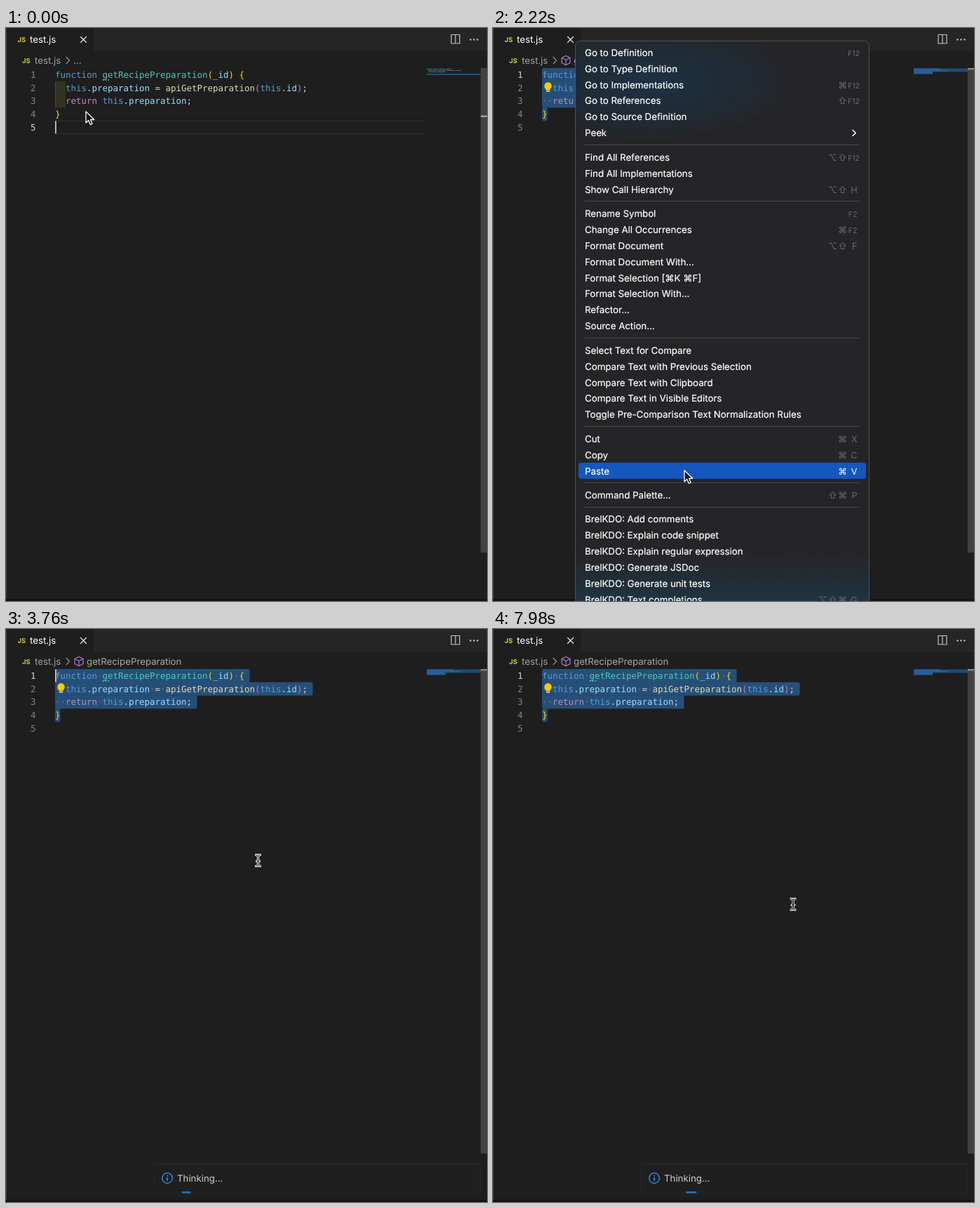
Write an HTML page that moves like this. It is 686x816 px and loops after 8000 ms.

```html
<!DOCTYPE html>
<html lang="en">
<head>
<meta charset="utf-8">
<title>Editor context menu</title>
<style>
  html, body { margin: 0; width: 100%; height: 100%; overflow: hidden; background: #1e1e1e; }
  svg { display: block; width: 686px; height: 816px; }
  text { font: 13.27px Inter, "DejaVu Sans", sans-serif; white-space: pre; text-rendering: geometricPrecision; }
  .code text { font: 12.46px "DejaVu Sans Mono", monospace; }
  .js { font-size: 9.4px; font-weight: 700; fill: #cbcb41; }
  .label { fill: #fff; stroke: #fff; stroke-width: .2px; }
  .key { font-size: 12.6px; fill: #6c6c6f; }
  .key.small { font-size: 10.6px; }
  .key.on { fill: #fff; }
  .line { fill: none; stroke-linecap: round; stroke-linejoin: round; }
</style>
</head>
<body>
<svg viewBox="0 0 686 816">
  <defs>
    <radialGradient id="topTint" gradientUnits="userSpaceOnUse" cx="0" cy="0" r="1" gradientTransform="translate(225 75) scale(215 85)">
      <stop offset="0" stop-color="#1b344b" stop-opacity=".8"/>
      <stop offset=".6" stop-color="#1b3042" stop-opacity=".5"/>
      <stop offset="1" stop-color="#1b3042" stop-opacity="0"/>
    </radialGradient>
    <linearGradient id="bottomTint" x2="0" y2="1">
      <stop offset="0" stop-color="#1d394a" stop-opacity="0"/>
      <stop offset="1" stop-color="#1d394a" stop-opacity=".75"/>
    </linearGradient>
  </defs>

  <rect width="686" height="816" fill="#1e1e1e"/>
  <rect x="125" width="561" height="33" fill="#252526"/>
  <rect width="1" height="816" fill="#3a3a3a"/>
  <rect y="813" width="686" height="3" fill="#190f15"/>
  <text class="js" x="16.5" y="20">JS</text>
  <text x="34" y="21.3" fill="#fff">test.js</text>
  <path class="line" d="M106.5 12.5l8 8m0-8l-8 8" stroke="#e8e8e8" stroke-width="1.2"/>
  <path class="line" d="M635 9.5h12v12.5h-12zM641 9.5v12.5" stroke="#c5c5c5" stroke-width="1.2"/>
  <g fill="#c5c5c5"><circle cx="662.5" cy="16.5" r="1.2"/><circle cx="667.5" cy="16.5" r="1.2"/><circle cx="672.5" cy="16.5" r="1.2"/></g>

  <text class="js" x="23" y="49.5">JS</text>
  <text id="crumbFile" x="41" y="51">test.js</text>
  <path class="line" d="M86 41.5l4.5 4.7-4.5 4.7" stroke="#a0a0a0" stroke-width="1.1"/>
  <text id="crumbDots" x="96" y="51" fill="#a0a0a0">...</text>
  <g id="crumbSymbol">
    <path class="line" d="M104 39.5l6 3v7l-6 3.2-6-3.2v-7zM98 42.5l6 3 6-3M104 45.5v7" stroke="#b180d7" stroke-width="1.1"/>
    <text x="115" y="51" fill="#a9a9a9">getRecipePreparation</text>
  </g>

  <rect x="677" y="57" width="9" height="690" fill="#424242"/>
  <rect id="rulerMark" x="677" width="9" height="2.5"/>
  <g id="mapPlain">
    <path d="M600 58.5h35" stroke="#347e73" stroke-dasharray="8 1"/>
    <path d="M602 60.5h47M602 62.5h25" stroke="#4b7180" stroke-dasharray="12 1"/>
    <path d="M600 66h77" stroke="#264f78" stroke-width="2"/>
  </g>
  <g id="mapSelected">
    <rect x="600" y="57.5" width="77" height="5" fill="#1f4a75"/>
    <path d="M600 58.5h38M600 60.5h49M600 62.5h27M600 64.5h27" stroke="#265f97" stroke-width="2"/>
  </g>

  <g id="lineBox" fill="none" stroke="#303030"><path d="M70 132.5h526M70 150.5h526"/></g>
  <rect x="70" y="75.75" width="15" height="37.5" fill="#32321f"/>
  <path d="M70.5 75.75v37.5" stroke="#4a4a3c"/>
  <g id="selection" fill="#264f78"></g>
  <g id="code" class="code"></g>
  <g fill="#4ec9b0"><circle cx="138.7" cy="74" r="1"/><circle cx="142.4" cy="74" r="1"/><circle cx="146.1" cy="74" r="1"/></g>
  <g id="bulb">
    <path d="M78.5 77.3a5.3 5.3 0 0 1 3.1 9.5v1.7h-6.2v-1.7a5.3 5.3 0 0 1 3.1-9.5z" fill="#ffcc00"/>
    <path d="M76 90h5" stroke="#d8d8d8" stroke-width="1.6"/>
  </g>
  <rect id="caret" width="1.8" height="18" fill="#c8c8c5"/>

  <g id="toast">
    <rect x="211.5" y="761.5" width="465" height="42.5" fill="#1f1f20" stroke="#272728"/>
    <circle cx="230" cy="782" r="7.3" fill="none" stroke="#3794ff" stroke-width="1.3"/>
    <path d="M230 781v5M230 777.8v1.6" stroke="#3794ff" stroke-width="1.5"/>
    <text x="244" y="787" fill="#d0d0d0">Thinking...</text>
    <rect id="bar" y="801" height="2.4" fill="#1f78c8"/>
  </g>

  <g id="menu">
    <rect x="117.5" y="18.5" width="419" height="830" rx="6" fill="#252527" stroke="#505053"/>
    <rect x="118" y="19" width="418" height="150" rx="6" fill="url(#topTint)"/>
    <rect x="118" y="745" width="418" height="71" fill="url(#bottomTint)"/>
    <rect id="highlight" x="122" width="410" height="23" rx="4" fill="#1457bf"/>
  </g>

  <g stroke-linejoin="round">
    <path id="arrow" d="M0 0v16l3.7-3.5 2.6 6 2.8-1.2-2.6-5.8h5.2z" fill="#111" stroke="#fff" stroke-width="1.3"/>
    <g id="beam" fill="none" stroke-linecap="round">
      <path d="M-3 -8q3 0 3 2.5v11q0 2.5-3 2.5M3 -8q-3 0-3 2.5v11q0 2.5 3 2.5M-2 1h4" stroke="#f4f4f4" stroke-width="3.2"/>
      <path d="M-3 -8q3 0 3 2.5v11q0 2.5-3 2.5M3 -8q-3 0-3 2.5v11q0 2.5 3 2.5M-2 1h4" stroke="#111" stroke-width="1"/>
    </g>
    <path id="hand" d="M-1.4 1q0-1.6 1.4-1.6T1.4 1v5.2l2.2.2 2.2.6 1.8 1q1 .7.7 2.5l-.8 3.2-1.5 3.3h-6.5q-1-2.3-2.8-4.2l-2.5-3q-.6-1.8 1.3-1.7l3.1 2z" fill="#fff" stroke="#222" stroke-width=".9"/>
  </g>
</svg>
<script>
const LOOP = 8000, ROW = 18.75, TOP = 57, LEFT = 70, CHAR = 7.5;
const $ = id => document.getElementById(id);
const clamp = (v, lo, hi) => Math.min(hi, Math.max(lo, v));

function add(parent, tag, attrs, content) {
  const el = document.createElementNS("http://www.w3.org/2000/svg", tag);
  set(el, attrs);
  if (content) el.textContent = content;
  return parent.appendChild(el);
}
function set(el, attrs) {
  for (const name in attrs) el.setAttribute(name, attrs[name]);
}
const show = (el, on) => { el.style.display = on ? "" : "none"; };

// Code: each line is a list of [colour, text] pieces.
const BLUE = "#569cd6", SKY = "#9cdcfe", GOLD = "#ffd700", PINK = "#da70d6", PLAIN = "#d4d4d4";
const lines = [
  [[BLUE, "function "], ["#4ec9b0", "getRecipePreparation"], [GOLD, "("], [SKY, "_id"], [GOLD, ") {"]],
  [[BLUE, "  this"], [PLAIN, "."], [SKY, "preparation"], [PLAIN, " = "], ["#dcdcaa", "apiGetPreparation"],
   [PINK, "("], [BLUE, "this"], [PLAIN, "."], [SKY, "id"], [PINK, ")"], [PLAIN, ";"]],
  [["#c586c0", "  return "], [BLUE, "this"], [PLAIN, "."], [SKY, "preparation"], [PLAIN, ";"]],
  [[GOLD, "}"]],
  []
];
const numbers = [], selected = [];
lines.forEach((pieces, i) => {
  const y = TOP + 13.8 + i * ROW;
  numbers.push(add($("code"), "text", { x: 42.5, y, "text-anchor": "end" }, String(i + 1)));
  const row = add($("code"), "text", { x: LEFT, y });
  pieces.forEach(([fill, text]) => add(row, "tspan", { fill }, text));
  if (i > 3) return;
  const text = row.textContent;
  const width = (text.length + (i < 3 ? 1 : 0)) * CHAR;
  const back = add($("selection"), "rect", { x: LEFT, y: TOP + i * ROW, width, height: ROW + .2, rx: 2.5 });
  const dots = add($("code"), "text", { x: LEFT, y, fill: "#e3e4e2", opacity: .3 },
    [...text].map(c => c === " " ? "·" : " ").join(""));
  selected.push([back, dots]);
});

// Menu: groups of "label|modifiers|key".
const BOT = "BrelKDO: ";
const groups = [
  ["Go to Definition||F12", "Go to Type Definition", "Go to Implementations|⌘|F12", "Go to References|⇧|F12",
   "Go to Source Definition", "Peek"],
  ["Find All References|⌥⇧|F12", "Find All Implementations", "Show Call Hierarchy|⌥⇧|H"],
  ["Rename Symbol||F2", "Change All Occurrences|⌘|F2", "Format Document|⌥⇧|F", "Format Document With...",
   "Format Selection [⌘K ⌘F]", "Format Selection With...", "Refactor...", "Source Action..."],
  ["Select Text for Compare", "Compare Text with Previous Selection", "Compare Text with Clipboard",
   "Compare Text in Visible Editors", "Toggle Pre-Comparison Text Normalization Rules"],
  ["Cut|⌘|X", "Copy|⌘|C", "Paste|⌘|V"],
  ["Command Palette...|⇧⌘|P"],
  ["Add comments", "Explain code snippet", "Explain regular expression", "Generate JSDoc",
   "Generate unit tests", "Text completions|⌥⇧⌘|G"].map(label => BOT + label)
];
const items = [];
let itemY = 34.9;
groups.forEach((group, g) => {
  if (g) {
    add($("menu"), "rect", { x: 131, y: Math.round(itemY - 6.3), width: 391, height: 1, fill: "#4b4b4e" });
    itemY += 11.45;
  }
  group.forEach(entry => {
    const [label, mods = "", key = ""] = entry.split("|");
    const y = itemY + 4.8, keys = [];
    add($("menu"), "text", { class: "label", x: 131, y }, label);
    [...mods].reverse().forEach((mod, i) =>
      keys.push(add($("menu"), "text", { class: "key", x: 498.5 - 14 * i, y, "text-anchor": "middle" }, mod)));
    if (key) keys.push(add($("menu"), "text", {
      class: key.length > 1 ? "key small" : "key", x: key === "F12" ? 523 : 519.5, y, "text-anchor": "end"
    }, key));
    if (label === "Peek") add($("menu"), "path", {
      class: "line", d: `M513 ${itemY - 4}l4.3 4-4.3 4`, stroke: "#fff", "stroke-width": 1.6
    });
    items.push({ y: itemY, keys });
    itemY += 22.92;
  });
});

// Pointer stops: time, x, y.
const stops = [
  [0, 114, 119], [60, 114, 119], [220, 79, 123], [300, 79, 123], [680, 25, 18], [860, 29, 21],
  [1120, 57, 48], [1200, 57, 48], [1520, 116, 88], [1760, 116, 88], [2180, 273, 630], [2260, 273, 630],
  [2620, 291, 768], [3020, 292, 768], [3220, 287, 672], [3560, 350, 350], [3900, 365, 318],
  [5200, 365, 318], [5500, 364, 318], [7420, 364, 318], [7900, 428, 392], [LOOP, 428, 392]
];
function pointerAt(t) {
  const i = stops.findIndex(s => s[0] > t);
  const [t0, x0, y0] = stops[i - 1], [t1, x1, y1] = stops[i];
  const u = (t - t0) / (t1 - t0), e = u * u * (3 - 2 * u);
  return [x0 + (x1 - x0) * e, y0 + (y1 - y0) * e];
}
function pointerKind(t, y) {
  if (t > 900 && t < 1400 && y > 36 && y < 57) return "hand";
  const editing = t > 130 && t < 1660 || t > 3280;
  return editing && y > 57 ? "beam" : "arrow";
}

const MENU_OPEN = 1660, MENU_FADE = 3040, MENU_GONE = 3270, TOAST = 3405;

function drawEditor(t, y) {
  const dragging = t >= 220;
  const line = !dragging ? 4 : t > 700 ? 0 : clamp(Math.floor((y - TOP) / ROW), 0, 3);
  const hasSelection = t >= 340;
  selected.forEach((row, i) => row.forEach(el => show(el, hasSelection && i >= line)));
  numbers.forEach((el, i) => set(el, { fill: i === line ? "#d6d6d6" : "#858585" }));
  show($("lineBox"), !dragging);
  show($("mapPlain"), !hasSelection);
  show($("mapSelected"), hasSelection);
  set($("rulerMark"), { y: dragging ? TOP + line * 17 : 124.5, fill: dragging ? "#8f866c" : "#a0a0a0" });
  show($("crumbDots"), t < 500);
  show($("crumbSymbol"), t >= 500);
  show($("bulb"), t >= 900);

  const menuUp = t >= MENU_OPEN && t < 3300;
  const blinkStart = t >= 3300 ? 3300 : t >= 700 ? 700 : 220;
  const lit = t < 220 || (t - blinkStart) % 1000 < 500;
  show($("caret"), lit && !menuUp);
  set($("caret"), { x: dragging && !hasSelection ? LEFT + CHAR : LEFT, y: TOP + .4 + line * ROW });
}

function drawMenu(t, y) {
  const menu = $("menu");
  show(menu, t >= MENU_OPEN && t < MENU_GONE);
  menu.style.opacity = clamp((MENU_GONE - t) / (MENU_GONE - MENU_FADE), 0, 1);
  // While fading, the brighter code shows through undimmed.
  menu.style.mixBlendMode = t > MENU_FADE ? "lighten" : "normal";
  const aim = t > 3000 ? 768 : y;
  const active = t < 1800 ? -1 : items.findIndex(item => Math.abs(item.y - aim) < 11.46);
  show($("highlight"), active >= 0);
  if (active >= 0) set($("highlight"), { y: Math.round(items[active].y - 11.5) });
  items.forEach((item, i) => item.keys.forEach(el => el.classList.toggle("on", i === active)));
}

function drawToast(t) {
  show($("toast"), t >= TOAST);
  set($("toast"), { opacity: clamp((t - TOAST) / 150, 0, 1) });
  const p = Math.max(0, t - TOAST) % 4000 / 4000, unit = 9.32;
  const shift = p < .5 ? 50 * p : 25 + 48 * (p - .5);
  const width = unit * (3 - 4 * Math.abs(p - .5));
  set($("bar"), { x: Math.max(211, 211 + unit * (shift + .5) - width / 2), width });
}

function render(t) {
  const [x, y] = pointerAt(t), kind = pointerKind(t, y);
  drawEditor(t, y);
  drawMenu(t, y);
  drawToast(t);
  set($("crumbFile"), { fill: kind === "hand" ? "#e0e0e0" : "#a0a0a0" });
  ["arrow", "beam", "hand"].forEach(id => show($(id), id === kind));
  set($(kind), { transform: `translate(${x.toFixed(2)} ${y.toFixed(2)})` });
}

const start = performance.now();
function tick() {
  render((performance.now() - start) % LOOP);
  requestAnimationFrame(tick);
}
tick();
</script>
</body>
</html>
```
